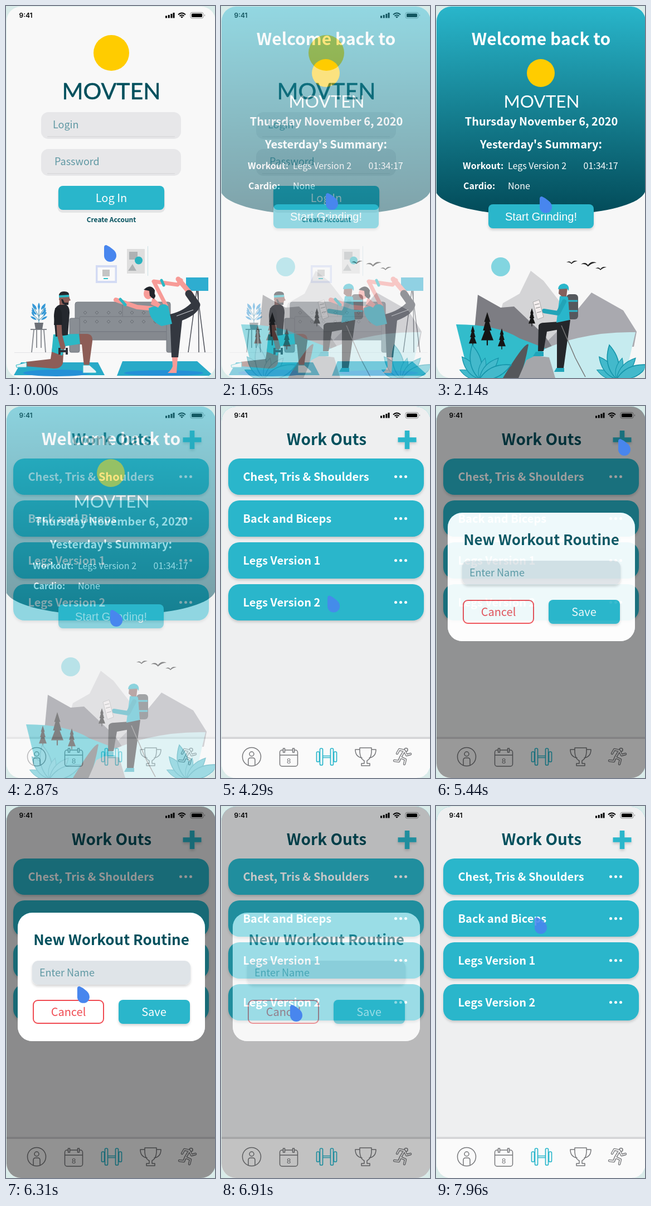
An HTML page for the animation above (8000 ms loop, 375 by 666 pixels).

```html
<!DOCTYPE html>
<html lang="en">
<head>
<meta charset="utf-8">
<title>Workout app</title>
<style>
html, body { margin: 0; width: 100%; height: 100%; overflow: hidden; background: #d9ebe9; }
svg { display: block; width: 375px; height: 666px; }
text { font-family: "Noto Sans CJK JP", "Noto Sans CJK SC", "Noto Sans CJK", "Noto Sans", sans-serif; }
.b { font-weight: 700; }
.mid { text-anchor: middle; }
.w { fill: #fff; }
.ink { fill: #02505d; }
.hint { fill: #5f98a3; font-size: 18px; }
.btn { font-size: 20px; }
.teal { fill: #29b6cb; }
.brand { font-family: Lato, sans-serif; stroke-linejoin: round; }
.arial { font-family: "Liberation Sans", Arial, sans-serif; }
.line { fill: none; stroke-linecap: round; stroke-linejoin: round; }
</style>
</head>
<body>
<svg viewBox="0 0 375 666">
<defs>
  <clipPath id="phone"><rect x="1" y="1" width="375" height="665" rx="26"/></clipPath>
  <linearGradient id="sky" x2="0" y2="1">
    <stop stop-color="#29b6cb"/><stop offset="1" stop-color="#024a58"/>
  </linearGradient>
  <filter id="soft" x="-20%" y="-20%" width="140%" height="150%">
    <feDropShadow dx="0" dy="3" stdDeviation="2" flood-opacity=".16"/>
  </filter>
  <g id="status">
    <text x="23.500" y="21" font-size="12" font-weight="600" style="font-family:Inter,sans-serif">9:41</text>
    <path d="M287.500 21.500v-4M292.200 21.500v-5.500M296.900 21.500v-7.500M301 21.500v-9.500" stroke="#000" stroke-width="3"/>
    <path d="M309 15.500q6.500-6 13 0M311.500 18q4-3.500 8 0" fill="none" stroke="#000" stroke-width="2"/>
    <path d="M313.200 19.500q2.300-1.800 4.600 0l-2.300 2.300z"/>
    <rect x="331" y="11.500" width="23" height="10.500" rx="3" fill="none" stroke="#000" stroke-opacity=".4"/>
    <rect x="333" y="13.500" width="19" height="6.500" rx="1.500"/>
    <path d="M356 15q2 1.700 0 3.500z" opacity=".5"/>
  </g>
  <path id="tree" d="M0 0L5 16 3 16 7 30 4 30 10 46H1V54H-1V46H-10L-4 30H-7L-3 16H-5Z" fill="#151515"/>
  <path id="bird" d="M-10 1q6-4 9 1 4-6 11-3-6-0-11 5-3-4-9-3z" fill="#222"/>
  <path id="leaf" d="M0 0q-8-12 0-26 8 14 0 26z"/>
</defs>

<g clip-path="url(#phone)">
  <!-- login -->
  <g>
    <rect width="375" height="666" fill="#f8f8f8"/>
    <use href="#status"/>
    <circle cx="189" cy="84" r="32" fill="#ffcc00"/>
    <text class="brand ink mid" x="189" y="167" font-size="41" stroke="#02505d" stroke-width=".6">MOVTEN</text>
    <g fill="#e7e7e9">
      <rect x="63" y="190" width="251" height="48" rx="13"/>
      <rect x="63" y="256" width="251" height="48" rx="13"/>
    </g>
    <path d="M74 234H303M74 300H303" stroke="#d9d9dc" stroke-width="1.500"/>
    <text class="hint" x="84" y="219">Login</text>
    <text class="hint" x="87" y="285">Password</text>
    <rect x="92.500" y="325" width="193" height="45" rx="9" fill="#e4e4e5"/>
    <rect class="teal" x="94" y="322" width="190" height="43" rx="8"/>
    <text class="btn w mid" x="189" y="351">Log In</text>
    <text class="b ink mid" x="189" y="387" font-size="12">Create Account</text>

    <!-- living room -->
    <path d="M15 620.500H371" stroke="#e3e3e6"/>
    <path d="M161 464h38v32h-38z" fill="#d3dbf4"/>
    <path d="M164.500 468h31v24h-31z" fill="#fafafa"/>
    <path d="M173 472h13v12h-13z" fill="#c4c4c4"/>
    <path d="M175 488h8" stroke="#2fc0c8" stroke-width="2"/>
    <path d="M217 435h32v44h-32z" fill="#dedede"/>
    <path d="M221 440h15v14h-15zM219 474h15l-7-12z" fill="#aeb1b3"/>
    <circle cx="238" cy="455.500" r="7" fill="#2bb3bf"/>
    <path d="M254.500 430V483" stroke="#cbdfe4"/>
    <g fill="#898e94" stroke="#747980">
      <rect x="124" y="530" width="171" height="60" rx="4"/>
      <path d="M209 530v27"/>
      <rect x="132" y="556" width="157" height="27" rx="2"/>
      <rect x="132" y="583" width="157" height="15" fill="#85898f"/>
      <rect x="114" y="559" width="18" height="61" rx="3"/>
      <rect x="288" y="559" width="18" height="61" rx="3"/>
    </g>
    <path id="studs" fill="none" stroke="#686d73"/>
    <path d="M323 486h40v24h-40z" fill="#2eadd0"/>
    <path d="M342 510L327 620M343 510L357 620M345 510L346 620" stroke="#4b4e57" stroke-width="1.500"/>
    <path d="M44 579H73M50 580L46 620M68 580L71 620M55 580V612M63 580V612" stroke="#85898f" stroke-width="1.800"/>
    <path d="M51 567h16l-2 12H53z" fill="#6d7178"/>
    <path d="M59 567V540M59 563L46 549M59 563L73 549M59 556L50 540M59 556L69 540" stroke="#2f83a8"/>
    <g id="plant" fill="#3598d6"></g>

    <path d="M27 638H165L177 661H14z" fill="#28aac8"/>
    <ellipse cx="91" cy="657" rx="60" ry="6" fill="#2590d6"/>
    <path d="M209 636H343L372 662H199z" fill="#28aac8"/>
    <ellipse cx="283" cy="657" rx="71" ry="5" fill="#2590d6"/>
    <!-- kneeling man -->
    <g fill="#8d5d57">
      <path d="M83 612L103 622 102 640Q98 650 85 649L36 645V637L80 632z"/>
      <path d="M126 587H146Q156 588 155 600L149 645H140L136 606 126 605z"/>
      <path d="M96 526H108L109 541H96z"/>
    </g>
    <path d="M85 588L131 587 133 605 107 609 101 626 82 619z" fill="#2cb8c5"/>
    <path d="M96 535Q86 538 86 556L89 592 111 589 114 549Q114 538 108 535z" fill="#25282e"/>
    <path class="line" d="M95 566L96 588 102 611" stroke="#8d5d57" stroke-width="9"/>
    <path d="M88 541q9-3 12 8l1 22H86z" fill="#1f2227"/>
    <path d="M96 516q8-5 17 1l1 6 2 4-3 1-1 6q-7 1-11-2l-6-6z" fill="#8d5d57"/>
    <path d="M95 519q0-8 9-8 10 0 9 7zM99 525l3 0 3 6 7 0v4q-7 1-11-3z" fill="#24262c"/>
    <path d="M95 520l18-1" stroke="#2bb8c4" stroke-width="4"/>
    <path d="M97 618H109M96 612v12M109 612v12" stroke="#30323b" stroke-width="4"/>
    <path d="M138 643h12l12 11v3h-24zM18 643l19-5v9H19z" fill="#e9f3f6" stroke="#2bb8c4"/>
    <!-- stretching woman -->
    <g class="line">
      <path d="M332 516L309 489" stroke="#f79b97" stroke-width="9"/>
      <path d="M342 535L328 515" stroke="#343840" stroke-width="13"/>
      <path d="M267 542L235 539 197 526" stroke="#f79b97" stroke-width="8"/>
      <path d="M287 536L265 493 308 499 314 491" stroke="#f79b97" stroke-width="7"/>
      <path d="M205 525l9 10M279 491l4 9" stroke="#2bb8c4" stroke-width="5"/>
    </g>
    <path d="M294 552Q320 546 336 528L348 536Q345 552 316 563L309 629H297z" fill="#343840"/>
    <path d="M306 555L336 544" stroke="#d9dce0"/>
    <path d="M298 629H308L306 657H290Q297 651 299 645z" fill="#f79b97"/>
    <path d="M256 541Q265 536 274 538 284 530 291 538L298 569 279 573Q257 563 256 541z" fill="#29b6c8"/>
    <path d="M263 521l14 13-4 6-13-6z" fill="#f79b97"/>
    <ellipse cx="255" cy="515" rx="8" ry="10" fill="#f79b97"/>
    <path d="M247 508Q260 496 267 509L266 525 258 519 257 510z" fill="#22252b"/>
    <circle cx="264" cy="519" r="4" fill="#22252b"/>
  </g>

  <!-- welcome -->
  <g id="welcome">
    <rect width="375" height="666" fill="#f7f7f7"/>
    <circle cx="116" cy="467" r="17" fill="#82d5e0"/>
    <use href="#bird" x="244" y="458"/>
    <use href="#bird" transform="translate(274 461) scale(1.400)"/>
    <use href="#bird" x="296" y="469"/>
    <path d="M170 474L193 492 235 546 230 600H100L120 532 150 515z" fill="#d4d4d6"/>
    <path d="M279 513L336 545 360 583 355 610H190L240 560z" fill="#a9a9af"/>
    <path d="M75 517L116 540 140 538 195 590 215 620H60L70 570z" fill="#7d7d83"/>
    <path d="M36 570Q110 570 150 595L215 620 170 666H60z" fill="#32bccb"/>
    <path d="M358 584Q270 582 195 614L150 666H312L345 640z" fill="#c6ebef"/>
    <use href="#tree" transform="translate(66 572) scale(.7)"/>
    <use href="#tree" transform="translate(92 548) scale(1.100)"/>
    <use href="#tree" transform="translate(118 577) scale(.7)"/>
    <use href="#tree" transform="translate(172 541) scale(.6)"/>
    <path d="M120 666Q160 600 166 606 160 640 150 666z" fill="#55575b"/>
    <path d="M162 634L178 626 203 629 214 666H148z" fill="#a5a6aa"/>
    <g id="ferns" fill="#43b9cb" stroke="#1595aa" stroke-width=".7"></g>
    <!-- hiker -->
    <g fill="#25272b">
      <path d="M217 562H241L229 648H217z"/>
      <path d="M236 564L238 576 199 583 193 618H183L184 572Q186 567 194 567z"/>
    </g>
    <path d="M225 572L250 630 268 664" fill="none" stroke="#777" stroke-width="1.500"/>
    <rect x="234" y="516" width="21" height="45" rx="6" fill="#55585d"/>
    <path d="M237 528h17M237 546h17" stroke="#29b6cb" stroke-width="3"/>
    <path d="M222 520Q230 515 237 522L240 562 216 567z" fill="#29b6cb"/>
    <path class="line" d="M230 529L219 550 194 546" stroke="#22a4b8" stroke-width="8"/>
    <path d="M174 530l11-4 8 31-11 4z" fill="#f4eeee" stroke="#aaa"/>
    <path d="M177 535l8-2M179 541l8-2M181 549l8-2" stroke="#888"/>
    <path d="M221 504H236L234 520H226L220 515z" fill="#85605c"/>
    <path d="M219 507Q220 497 230 497 240 499 238 510L235 506z" fill="#29b6cb"/>
    <path d="M179 619h14v8h-19zM216 648h14v7h-18z" fill="#20a4b9"/>

    <path d="M0 0H375V333C350 389 25 389 0 333z" fill="url(#sky)"/>
    <g class="b w mid">
      <text x="188.500" y="70" font-size="30">Welcome back to</text>
      <text x="189" y="214" font-size="20">Thursday November 6, 2020</text>
      <text x="188.500" y="255" font-size="20">Yesterday's Summary:</text>
    </g>
    <circle cx="188" cy="120" r="25" fill="#ffcc00"/>
    <text class="brand w mid" x="189.500" y="182" font-size="31.500">MOVTEN</text>
    <g class="w" font-size="16">
      <text class="b" x="48" y="292">Workout:</text>
      <text class="b" x="49" y="328">Cardio:</text>
      <g font-weight="300">
        <text x="129" y="292">Legs Version 2</text>
        <text x="264.500" y="292">01:34:17</text>
        <text x="129" y="328">None</text>
      </g>
    </g>
    <rect class="teal" x="94" y="355" width="189" height="43" rx="8" filter="url(#soft)"/>
    <text class="arial btn w mid" x="188.500" y="384">Start Grinding!</text>
  </g>

  <!-- workouts -->
  <g id="workouts">
    <rect width="375" height="666" fill="#eeeff0"/>
    <use href="#status"/>
    <text class="b ink mid" x="189.500" y="70" font-size="28">Work Outs</text>
    <path d="M317.500 60.500h33M334 44v33" stroke="#29b6cb" stroke-width="8.500" filter="url(#soft)"/>
    <g id="cards"></g>
    <path d="M0 594.500H375" stroke="#d4d4d6" stroke-width="4"/>
    <rect y="596" width="375" height="70" fill="#fafafa"/>
    <g class="line" stroke="#76777a" stroke-width="1.500">
      <circle cx="55" cy="628" r="16.500"/>
      <circle cx="55" cy="623" r="4"/>
      <path d="M49 643V634q0-4 4-4h4q4 0 4 4v9"/>
      <rect x="105.500" y="616" width="32" height="29" rx="4"/>
      <path d="M106 625H137"/>
      <path d="M111.500 613h3v7h-3zM128.500 613h3v7h-3z" fill="#fafafa"/>
      <g stroke="#29b6cb" stroke-width="1.700">
        <rect x="171.500" y="619" width="5" height="18" rx="2"/>
        <rect x="177.500" y="613" width="5" height="30" rx="2"/>
        <rect x="196.500" y="613" width="5" height="30" rx="2"/>
        <rect x="202.500" y="619" width="5" height="18" rx="2"/>
        <path d="M183 626.500h13M183 629.500h13"/>
      </g>
      <path d="M249 612H270V620Q269 632 262 635V640H267V644H252V640H257V635Q250 632 249 620zM249 615H241Q241 628 253 630M270 615H278Q278 628 266 630"/>
      <circle cx="332" cy="615.500" r="3"/>
      <path id="runner" d="M316 622L320 615 329 617 333 625 340 623M329 617L322 629 331 633 329 641M322 629L319 636 311 635" stroke-width="4.500"/>
      <use href="#runner" id="runnerCore"/>
    </g>
    <text class="arial mid" x="121.500" y="640" font-size="13" fill="#76777a">8</text>
  </g>

  <!-- new routine dialog -->
  <g id="dialog">
    <path d="M0 0H375V666H0zM47 191H331a26 26 0 0 1 26 26V395a26 26 0 0 1-26 26H47a26 26 0 0 1-26-26V217a26 26 0 0 1 26-26z" fill-rule="evenodd" fill-opacity=".42"/>
    <rect x="21" y="191" width="336" height="230" rx="26" fill="#fff"/>
    <text class="b ink mid" x="189" y="249" font-size="26">New Workout Routine</text>
    <rect x="47" y="277" width="284" height="43" rx="11" fill="#dfe4e8" filter="url(#soft)"/>
    <text class="hint" x="60" y="305">Enter Name</text>
    <rect x="49" y="348" width="126" height="41" rx="8" fill="none" stroke="#f04b52" stroke-width="2"/>
    <text class="btn mid" x="112" y="376" fill="#f04b52">Cancel</text>
    <rect class="teal" x="202" y="347" width="128" height="43" rx="8" filter="url(#soft)"/>
    <text class="btn w mid" x="265.500" y="376">Save</text>
  </g>
  <path id="cursor" d="M0 4Q0 0 4 0 9 2 15 7 22 12 22 19A11 11 0 0 1 0 19z" fill="#4886ee"/>
</g>
</svg>

<script>
const $ = id => document.getElementById(id);

// The runner is an outline: a thick stroke with a light core on top.
const core = $('runner').cloneNode();
core.removeAttribute('id');
core.setAttribute('stroke', '#fafafa');
core.setAttribute('stroke-width', 1.8);
$('runnerCore').replaceWith(core);

$('cards').innerHTML = ['Chest, Tris &amp; Shoulders', 'Back and Biceps', 'Legs Version 1', 'Legs Version 2']
  .map((name, i) => `<g transform="translate(0 ${i * 75})">
    <rect class="teal" x="13" y="94" width="351" height="65" rx="20" filter="url(#soft)"/>
    <text class="b w" x="39.500" y="134" font-size="20">${name}</text>
    <path class="line" d="M313.500 126.500h0M322.500 126.500h0M331.500 126.500h0" stroke="#fff" stroke-width="5"/>
  </g>`).join('');

const leaf = (x, y, turn, size) =>
  `<use href="#leaf" transform="translate(${x} ${y}) rotate(${turn}) scale(${size})"/>`;
$('plant').innerHTML = [0, 1, 2].map(row => [-1, 1].map(side =>
  leaf(59 + side * 4, 562 - row * 9, side * (60 - row * 14), .5) +
  leaf(59 + side * 8, 556 - row * 7, side * (30 - row * 5), .4)).join('')).join('') + leaf(59, 544, 0, .5);
$('ferns').innerHTML = [78, 324].map(x => [-65, -38, -12, 15, 42, 66].map((turn, i) =>
  leaf(x, 668, turn, 1.5 + (i % 3) * .45)).join('')).join('');

let studs = '';
for (let i = 0; i < 7; i++)
  for (const y of [549, 565]) studs += `M${142 + i * 21} ${y - 3}l3 3-3 3-3-3z`;
$('studs').setAttribute('d', studs);

// Progress in n equal steps; the first step lands at `start`.
const steps = (t, start, end, n) => t < start ? 0
  : Math.min(1, (Math.floor((t - start) / (end - start) * (n - 1) + 1e-6) + 1) / n);
const easeOut = (u, power) => 1 - (1 - u) ** power;

// start, end, steps, x, y, x-curve, y-curve, sideways bow
const linear = u => u;
const moves = [
  [620, 1340, 12, 188, 335, linear, linear, 0],
  [2140, 2440, 5, 187, 365, linear, linear, -3],
  [4290, 4950, 12, 327, 59, u => u ** 1.5, linear, 3],
  [5500, 6070, 10, 131, 266, linear, linear, 0],
  [6130, 6610, 9, 124, 356, linear, u => easeOut(u, 1.7), 0],
  [7300, 7780, 9, 177, 199, linear, linear, 0]
];

function draw(t) {
  let x = 176, y = 428;
  for (const [start, end, n, toX, toY, curveX, curveY, bow] of moves) {
    const u = steps(t, start, end, n);
    x += (toX - x) * curveX(u) + bow * Math.sin(Math.PI * u);
    y += (toY - y) * curveY(u);
  }
  $('cursor').setAttribute('transform', `translate(${x} ${y})`);
  $('cursor').style.opacity = t >= 7960 || (t >= 4290 && t < 4350) ? .88 : 1;
  $('welcome').style.opacity = easeOut(steps(t, 1650, 1890, 5), 3);
  $('workouts').style.opacity = easeOut(steps(t, 2870, 3050, 4), 2.4);
  $('dialog').style.opacity = easeOut(steps(t, 5320, 5560, 5), 2.8)
    * (1 - easeOut(steps(t, 6850, 7060, 5), 1.25));
}

const begin = performance.now();
(function frame() {
  draw((performance.now() - begin) % 8000);
  requestAnimationFrame(frame);
})();
</script>
</body>
</html>
```
